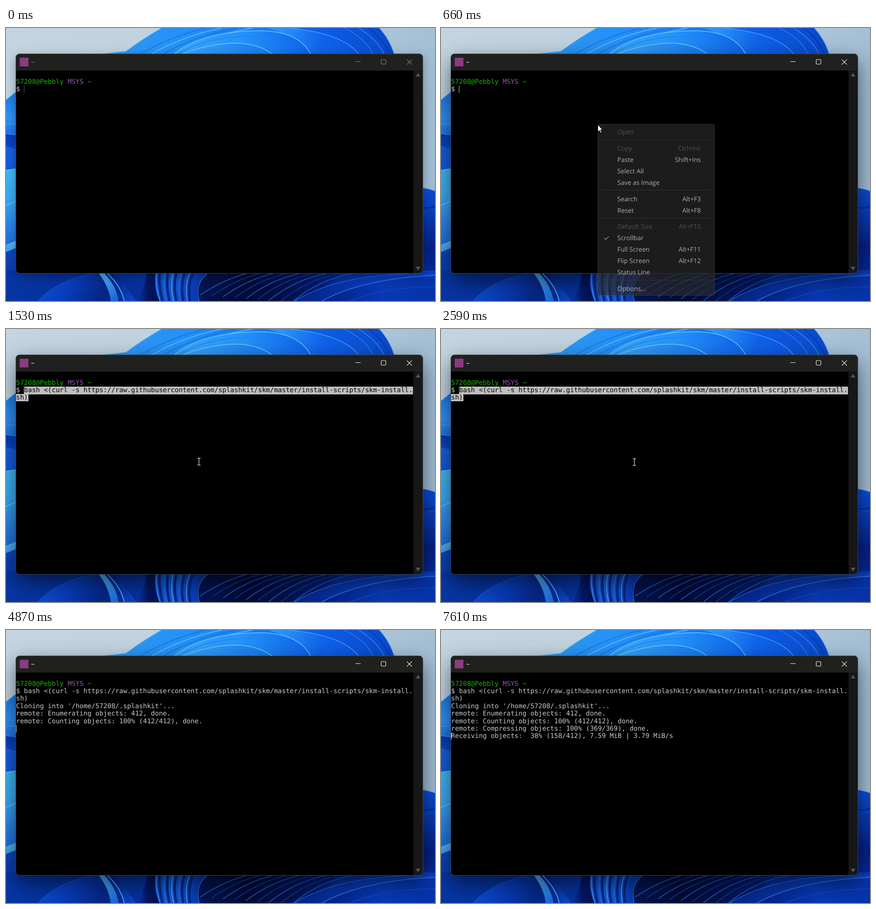
Animation, 937 px wide and 597 px high, one loop 8000 ms. Source, as an HTML page with a canvas:

```html
<!DOCTYPE html>
<html lang="en">
<head>
<meta charset="utf-8">
<title>Terminal install</title>
<style>
  html, body { margin: 0; width: 100%; height: 100%; overflow: hidden; background: #000; }
  canvas { display: block; }
</style>
</head>
<body>
<canvas id="stage" width="937" height="597"></canvas>
<script>
const W = 937, H = 597, LOOP = 8000, TICK = 200 / 3;
const CELL = 8.67, ROW = 16.4, LEFT = 22, TOP = 109.6;
const MONO = '14.4px "DejaVu Sans Mono", monospace';
const SANS = '14px "Open Sans", sans-serif';
const GREY = '#bfbfbf', TEXT = '#cacaca', GREEN = '#1fb200', PURPLE = '#9656b2';
const ctx = document.getElementById('stage').getContext('2d');

const clamp = v => Math.max(0, Math.min(1, v));
const ease = v => v * v * (3 - 2 * v);
const rowTop = r => Math.round(TOP + r * ROW);

function layer() {
  const c = document.createElement('canvas');
  c.width = W;
  c.height = H;
  return c.getContext('2d');
}

// ---- desktop ----

function drawWallpaper(g) {
  const blend = (box, colors) => {
    const grad = g.createLinearGradient(...box);
    colors.forEach((c, i) => grad.addColorStop(i / (colors.length - 1), c));
    return grad;
  };
  const fill = (d, box, ...colors) => {
    g.fillStyle = blend(box, colors);
    g.fill(new Path2D(d));
  };
  const line = (d, color, width = 1.2) => {
    g.strokeStyle = color;
    g.lineWidth = width;
    g.stroke(new Path2D(d));
  };

  fill('M0 0H937V597H0Z', [0, 0, 700, 480], '#c4d5e1', '#bed0de', '#9fbcd4');

  // upper petals
  fill('M205 58L262 51Q298 24 340 0H815Q838 25 848 58Z', [230, 50, 850, 20],
    '#2f98f4', '#2491f8', '#1a7cf4', '#0e5ce6', '#0947c8');
  line('M205 57L262 51Q298 24 340 0', '#4fb4f2');
  line('M815 0Q838 25 848 58', '#3b8ff0');
  for (let i = 0; i < 4; i++) {
    line(`M${290 + i * 26} 58Q${365 + i * 24} 16 ${438 + i * 34} 0`, i % 2 ? '#62c4fb' : '#1470e0', 1.5);
  }
  fill('M618 0Q738 12 771 58H666Q640 18 570 0Z', [600, 0, 780, 50], '#2b95fa', '#0f63ea', '#0a52dc');
  line('M618 0Q738 12 771 58', '#58b9fa');
  line('M738 0Q786 22 802 58', '#2f8bf2');
  line('M770 0Q812 26 826 58', '#3f9cf5');
  line('M792 0Q826 26 838 58', '#0837a8', 2);
  fill('M365 58Q430 6 560 6Q640 8 666 58Z', [370, 50, 670, 30], '#3aa6f9', '#2392fa', '#0d5fe8');
  line('M365 58Q430 6 560 6Q640 8 666 58', '#66c8fb', 1.5);
  line('M374 58Q440 17 540 18', '#1a78e6');
  fill('M383 58Q440 34 502 33Q552 34 583 58Z', [385, 50, 585, 50], '#3ba5fa', '#1577f0');
  line('M383 58Q440 34 502 33Q552 34 583 58', '#6accfb', 1.5);

  // left petals
  fill('M0 157L30 133V310H0Z', [0, 140, 0, 310], '#1c76e8', '#2f92f5', '#1760e0', '#1258dc');
  fill('M0 232L30 234V268L0 258Z', [0, 230, 0, 264], '#0538b4', '#0a48cc');
  fill('M0 310L30 306V500H0Z', [0, 308, 0, 490], '#3fb8f4', '#3aaaf2', '#2a84e6', '#1a64d6');
  line('M0 157L30 133', '#5ab8f5');
  line('M0 211L30 208', '#52b4f4');
  line('M0 231L30 235', '#4aaef0');
  line('M0 311L30 307', '#6cd0f8');
  line('M0 388L30 375', '#7ad8f8');
  fill('M0 474L30 462V480L0 490Z', [0, 465, 0, 490], '#58baf0', '#3f9ce8');
  fill('M0 490L30 478V597H0Z', [0, 485, 0, 560], '#0c46bc', '#0636a4');

  // right petal
  fill('M900 349Q924 351 937 357V597H900Z', [0, 350, 0, 545], '#0a4cd8', '#0738b0', '#041f84', '#052a98');
  line('M900 349Q924 351 937 357', '#2f78e0');
  line('M900 392Q925 396 937 390', '#042088', 2);
  line('M900 410Q925 396 937 399', '#1450c8');

  // lower petals
  fill('M0 530H937V597H0Z', [0, 0, 937, 0],
    '#0636a4', '#05309a', '#042a8c', '#0632a0', '#020e48', '#020a38', '#03145a', '#062c98', '#0636ac', '#083cb8');
  fill('M70 597Q110 552 190 537H212L228 597Z', [100, 545, 200, 597], '#0a48cc', '#0738b0', '#042684');
  line('M70 597Q110 552 190 537', '#1458d0');
  fill('M203 537Q225 566 229 597H246Q240 562 215 537Z', [205, 540, 245, 590], '#4faaf2', '#1868d8');
  fill('M222 537Q252 566 258 597H284Q262 562 236 537Z', [225, 540, 275, 597], '#04207c', '#0a44c0');
  line('M222 537Q252 566 258 597', '#4fa8f0', 2);
  fill('M284 597Q304 570 306 537H326Q322 572 336 597Z', [284, 0, 336, 0], '#0736ac', '#031660', '#021050');
  fill('M326 537Q322 572 336 597H422Q408 560 440 537Z', [326, 0, 440, 0], '#0c48c4', '#1458d0', '#0a40b8', '#0630a0');
  for (let i = 0; i < 5; i++) {
    const x = 329 + i * 18;
    line(`M${x} 537Q${x - 3 - i * 2} 562 ${x + 7 - i * 3} 597`, i % 2 ? '#2676e0' : '#4ca4f0', 1.6);
    line(`M${x + 7} 537Q${x + 4 - i * 2} 562 ${x + 13 - i * 3} 597`, '#042480', 5);
  }
  fill('M440 537Q412 558 422 597H655L730 537Z', [420, 0, 730, 0], '#031450', '#020a30', '#03124c', '#04207c');
  line('M440 537Q412 558 422 597', '#2a78d8', 1.5);
  for (let i = 0; i < 10; i++) {
    line(`M${424 + i * 25} ${584 + i * 2}Q${475 + i * 26} 550 ${525 + i * 29} 537`, i % 2 ? '#0a3098' : '#1450bc', 2);
  }
  fill('M630 597Q720 542 880 537H937V597Z', [640, 590, 937, 545], '#042484', '#0838b4', '#0a44cc');
  line('M630 597Q720 542 880 537', '#1a62d4', 1.5);
  fill('M690 597Q780 548 937 541V597Z', [700, 590, 937, 550], '#042080', '#0838b4', '#0632a8');
  line('M690 597Q780 548 937 541', '#2c7ce4', 1.5);
  line('M752 597Q830 566 937 566', '#0c44bc', 2);
}

function drawWindow(g, active) {
  const frame = new Path2D();
  frame.roundRect(21.5, 56.5, 889, 480, 8);
  g.save();
  g.shadowColor = active ? 'rgba(0,0,0,.55)' : 'rgba(0,0,0,.32)';
  g.shadowBlur = active ? 46 : 22;
  g.shadowOffsetY = active ? 16 : 6;
  g.fillStyle = '#000';
  g.fill(frame);
  g.restore();

  g.save();
  g.clip(frame);
  g.fillStyle = '#000';
  g.fillRect(21, 56, 890, 481);
  g.fillStyle = '#20211f';
  g.fillRect(21, 56, 890, 37);
  g.fillStyle = '#171717';
  g.fillRect(890, 93, 21, 444);
  g.restore();
  g.strokeStyle = 'rgba(85,92,102,.7)';
  g.lineWidth = 1;
  g.stroke(frame);

  g.fillStyle = '#55565e';
  g.fill(new Path2D('M895 106L900 98L905 106ZM895 522H905L900 530Z'));
  g.fillStyle = '#8b3b80';
  g.fillRect(30, 65, 19, 19);

  const tone = active ? '#fff' : '#85858a';
  g.fillStyle = tone;
  g.font = SANS;
  g.fillText('~', 54.5, 80);
  g.strokeStyle = tone;
  g.lineWidth = 1.1;
  g.stroke(new Path2D('M763 73.5H774.5M875.5 68.8L886.5 79.8M886.5 68.8L875.5 79.8'));
  g.beginPath();
  g.roundRect(819.5, 69, 10, 10, 1.5);
  g.stroke();
}

const desktops = [false, true].map(active => {
  const g = layer();
  drawWallpaper(g);
  drawWindow(g, active);
  return g.canvas;
});

// ---- terminal ----

const receiving = (pct, n, rate = '') => `Receiving objects: ${String(pct).padStart(3)}% (${n}/412)${rate}`;
const FAST = ', 7.59 MiB | 3.79 MiB/s';

// time, row, text
const output = [
  [1530, 1, '$ bash <(curl -s https://raw.githubusercontent.com/splashkit/skm/master/install-scripts/skm-install.'],
  [1530, 2, 'sh)'],
  [3480, 3, "Cloning into '/home/57208/.splashkit'..."],
  [4740, 4, 'remote: Enumerating objects: 412, done.'],
  [4740, 5, 'remote: Counting objects:  64% (264/412)'],
  [4870, 5, 'remote: Counting objects: 100% (412/412), done.'],
  [5610, 6, 'remote: Compressing objects:  22% (82/369)'],
  [5680, 6, 'remote: Compressing objects:  68% (251/369)'],
  [5740, 6, 'remote: Compressing objects: 100% (369/369), done.'],
  [5740, 7, receiving(1, 5)],
  [5810, 7, receiving(17, 71)],
  [5880, 7, receiving(30, 124)],
  [6670, 7, receiving(32, 132, ', 956.00 KiB | 938.00 KiB/s')],
  [7410, 7, receiving(35, 145, FAST)],
  [7540, 7, receiving(37, 153, FAST)],
  [7610, 7, receiving(38, 158, FAST)],
];

// time, column, row; no column means hidden
const carets = [
  [0, 2, 1], [1190], [1530, 3, 2], [2060], [2590, 2, 1], [2660, 0, 3], [3210],
  [3480, 0, 4], [4010], [4540, 0, 4], [4740, 0, 6], [5410], [5610, 0, 6],
  [5740, 0, 7], [6340], [6670, 0, 7], [7140], [7410, 0, 7],
];

function put(text, col, row, color) {
  ctx.fillStyle = color;
  ctx.fillText(text, LEFT + col * CELL, rowTop(row) + 12);
}

function drawTerminal(t, active) {
  ctx.font = MONO;
  put('57208@Pebbly', 0, 0, GREEN);
  put('MSYS', 13, 0, PURPLE);
  put('~', 18, 0, GREEN);

  const lines = [, '$'];
  for (const [time, row, text] of output) if (t >= time) lines[row] = text;
  lines.forEach((text, row) => put(text, 0, row, TEXT));

  const selected = t >= 1530 && t < 2660;
  if (selected) {
    ctx.fillStyle = GREY;
    ctx.fillRect(39, rowTop(1), 850, 17);
    ctx.fillRect(22, rowTop(2), 27, 16);
    put(lines[1].slice(2), 2, 1, '#000');
    put(lines[2], 0, 2, '#000');
  }

  const [, col, row] = carets.filter(c => t >= c[0]).pop();
  if (col === undefined) return;
  const x = Math.floor(LEFT + col * CELL), y = rowTop(row);
  ctx.fillStyle = selected && row === 1 ? '#8a4a30' : GREY;
  if (active) ctx.fillRect(x, y, 1, 16);
  else for (let i = 0; i < 16; i += 2) ctx.fillRect(x, y + i, 1, 1);
}

// ---- context menu ----

// centre line, label, shortcut, disabled
const items = [
  [227, 'Open', '', true],
  [263, 'Copy', 'Ctrl+Ins', true],
  [288, 'Paste', 'Shift+Ins'],
  [313, 'Select All', ''],
  [338, 'Save as Image', ''],
  [373.5, 'Search', 'Alt+F3'],
  [398.5, 'Reset', 'Alt+F8'],
  [434, 'Default Size', 'Alt+F10', true],
  [459, 'Scrollbar', ''],
  [484, 'Full Screen', 'Alt+F11'],
  [509, 'Flip Screen', 'Alt+F12'],
  [534, 'Status Line', ''],
  [570, 'Options...', ''],
];

function drawMenu(alpha, hoverY) {
  ctx.save();
  ctx.globalAlpha = alpha;
  ctx.beginPath();
  ctx.roundRect(342.5, 210.5, 255, 374, 4);
  ctx.fillStyle = '#2c2c2c';
  ctx.fill();
  ctx.strokeStyle = '#484848';
  ctx.lineWidth = 1;
  ctx.stroke();
  ctx.fillStyle = '#404040';
  for (const y of [244, 354, 415, 551]) ctx.fillRect(352, y, 236, 1);

  ctx.font = SANS;
  for (const [y, label, keys, disabled] of items) {
    if (!disabled && Math.abs(hoverY - y) < 12.5) {
      ctx.fillStyle = '#363636';
      ctx.beginPath();
      ctx.roundRect(349, y - 13, 242, 25, 3);
      ctx.fill();
    }
    ctx.fillStyle = disabled ? '#6c6c6c' : '#fff';
    ctx.fillText(label, 385, y + 5);
    ctx.textAlign = 'right';
    ctx.fillText(keys, 567.5, y + 5);
    ctx.textAlign = 'left';
  }
  ctx.strokeStyle = '#fff';
  ctx.lineWidth = 1.1;
  ctx.stroke(new Path2D('M356.5 459.5L359.7 462.5L366.5 455.8'));
  ctx.restore();
}

// ---- pointer ----

const arrow = new Path2D('M.5 .5V16L4 12.8L6.4 18.4L8.8 17.3L6.4 11.8H11Z');
const beam = new Path2D('M-3.5 -7.5H-1L0 -6.5L1 -7.5H3.5M0 -6.5V6.5M-3.5 7.5H-1L0 6.5L1 7.5H3.5');

// time, x, y
const track = [
  [110, 420, 585], [460, 342, 211], [645, 342, 211], [915, 424, 307],
  [1150, 424, 307], [1250, 420, 289], [1510, 420, 289], [1525, 422, 291],
];

function pointerAt(t) {
  const i = track.findIndex(p => t < p[0]);
  if (i < 0) return track[track.length - 1].slice(1);
  const [t0, x0, y0] = track[Math.max(0, i - 1)], [t1, x1, y1] = track[i];
  const k = t1 > t0 ? ease(clamp((t - t0) / (t1 - t0))) : 0;
  return [x0 + (x1 - x0) * k, y0 + (y1 - y0) * k];
}

function drawPointer(t, x, y, menuOpen) {
  if (t < 120 || t >= 2660) return;
  ctx.save();
  ctx.translate(Math.round(x), Math.round(y));
  if (menuOpen || y > 537) {
    ctx.fillStyle = '#fff';
    ctx.strokeStyle = '#000';
    ctx.lineWidth = 1;
    ctx.fill(arrow);
    ctx.stroke(arrow);
  } else {
    ctx.translate(.5, 0);
    ctx.strokeStyle = '#fff';
    ctx.lineWidth = 1.1;
    ctx.stroke(beam);
  }
  ctx.restore();

  const press = t >= 520 && t < 655 ? 'rgba(255,0,0,.5)'
    : t >= 1400 && t < 1530 ? 'rgba(255,255,0,.5)' : null;
  if (press) {
    ctx.fillStyle = press;
    ctx.beginPath();
    ctx.arc(x, y + .5, 14.5, 0, Math.PI * 2);
    ctx.fill();
  }
}

function draw(t) {
  const active = t >= 520, menuOpen = t >= 580 && t < 1530;
  const tick = 120 + Math.floor((t - 115) / TICK) * TICK;
  const [x, y] = pointerAt(tick);
  ctx.textRendering = 'geometricPrecision';
  ctx.drawImage(desktops[+active], 0, 0);
  drawTerminal(t, active);
  if (menuOpen) drawMenu(clamp((tick - 545) / 170), y);
  drawPointer(t, x, y, menuOpen);
}

function loop() {
  draw(performance.now() % LOOP);
  requestAnimationFrame(loop);
}
loop();
</script>
</body>
</html>
```
